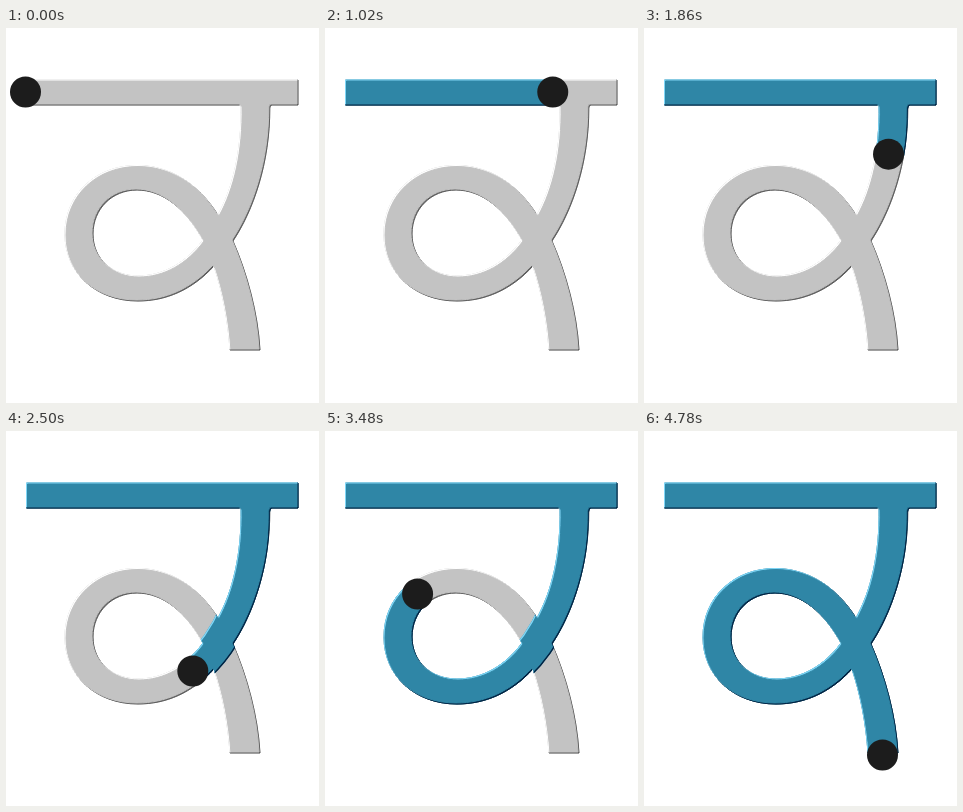
Animation, 313 px wide and 375 px high, one loop 4.8 s. Source, as an HTML page:

```html
<!DOCTYPE html>
<html lang="en">
<head>
<meta charset="utf-8">
<title>Letter stroke order</title>
<style>
  html, body { margin: 0; width: 100%; height: 100%; overflow: hidden; background: #fff; }
  svg { display: block; width: 313px; height: 375px; }
</style>
</head>
<body>
<svg viewBox="0 0 313 375">
  <defs>
    <path id="letter" fill-rule="evenodd" stroke-width="1" d="M20.5 52H292V77H266Q264 77 263.8 80
      C264 135 247 183 227 213C241 245 252 285 254 322H224
      C222 291 216 262 208 238C186 262 160 273 132 273
      C90 273 59 245 59 206C59 166 90 137.5 131 137.5
      C163 137.5 192 155 212 187C227 160 236 122 235 77H20.5Z
      M197 212C180 235 157 248 132 248C106 248 87 231 87 206
      C87 181 106 162 131 162C157 162 180 181 197 212Z"/>

    <!-- Brightens the upper left edges and darkens the lower right ones. -->
    <filter id="bevel" filterUnits="userSpaceOnUse" x="0" y="0" width="313" height="375"
      color-interpolation-filters="sRGB">
      <feComponentTransfer in="SourceGraphic" result="bright">
        <feFuncR type="linear" intercept=".32"/>
        <feFuncG type="linear" intercept=".32"/>
        <feFuncB type="linear" intercept=".32"/>
      </feComponentTransfer>
      <feComponentTransfer in="SourceGraphic" result="dim">
        <feFuncR type="linear" intercept="-.4"/>
        <feFuncG type="linear" intercept="-.4"/>
        <feFuncB type="linear" intercept="-.4"/>
      </feComponentTransfer>
      <feGaussianBlur in="SourceAlpha" stdDeviation=".6" result="soft"/>
      <feOffset in="soft" dx="1.4" dy="1.4" result="lower"/>
      <feOffset in="soft" dx="-1.4" dy="-1.4" result="upper"/>
      <feComposite in="bright" in2="lower" operator="out" result="light"/>
      <feComposite in="dim" in2="upper" operator="out" result="shade"/>
      <feMerge>
        <feMergeNode in="SourceGraphic"/>
        <feMergeNode in="light"/>
        <feMergeNode in="shade"/>
      </feMerge>
    </filter>

    <mask id="written" maskUnits="userSpaceOnUse" x="0" y="0" width="313" height="375">
      <path id="route" fill="none" stroke="#fff" stroke-width="33" stroke-linejoin="round"
        d="M19.5 64H292H247C250 130 237 177 212 213
        C191 243 161 261 131 261C95 261 73 240 73 206
        C73 174 97 150 131 150C162 150 192 166 212 213
        C226 246 236 284 238.5 324"/>
    </mask>
  </defs>
  <use href="#letter" fill="#c3c3c3" stroke="#c3c3c3" filter="url(#bevel)"/>
  <g filter="url(#bevel)">
    <use href="#letter" fill="#2f86a6" stroke="#2f86a6" mask="url(#written)"/>
  </g>
  <circle id="pen" r="15.5" fill="#1c1c1c"/>
</svg>
<script>
  const LOOP = 4800, STEP = 20;
  const route = document.getElementById('route');
  const pen = document.getElementById('pen');
  const total = route.getTotalLength();

  function draw() {
    const step = Math.floor(performance.now() % LOOP / STEP);
    const length = total * step / (LOOP / STEP - 1);
    const { x, y } = route.getPointAtLength(length);
    route.setAttribute('stroke-dasharray', `${length} ${total + 100}`);
    pen.setAttribute('cx', x);
    pen.setAttribute('cy', y);
    requestAnimationFrame(draw);
  }
  draw();
</script>
</body>
</html>
```
